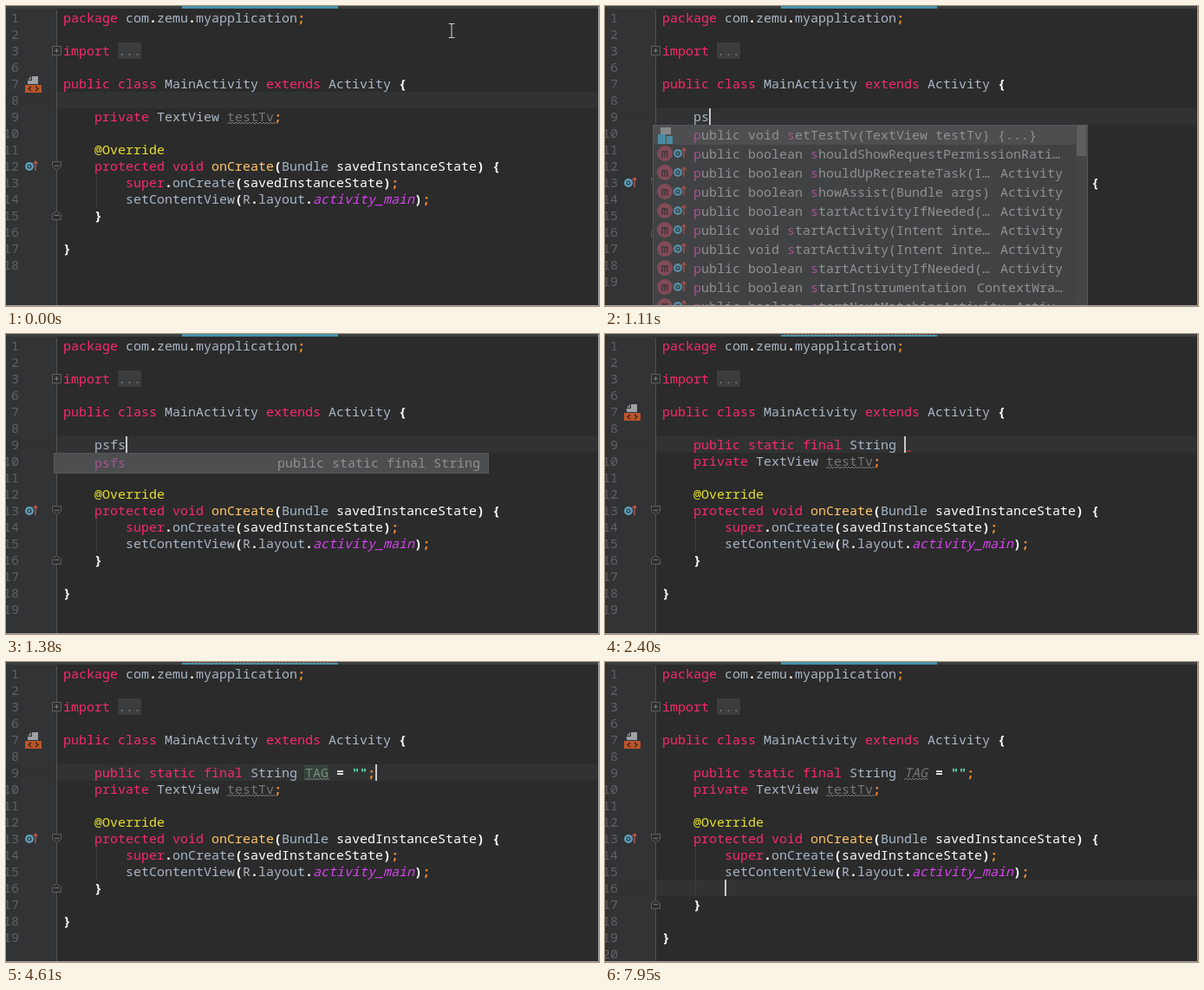
Animation of 684 by 346 pixels, one loop 8000 ms. Source, as an HTML page:

```html
<!DOCTYPE html>
<html lang="en">
<head>
<meta charset="utf-8">
<title>Live template in a code editor</title>
<style>
  html, body { margin: 0; width: 100%; height: 100%; overflow: hidden; background: #2b2b2b; }
  svg { display: block; width: 684px; height: 346px; }
  text { font: 15px "Noto Sans Mono", "DejaVu Sans Mono", monospace; white-space: pre; fill: #a9b7c6; }
  .num { fill: #606366; text-anchor: end; }
  .k { fill: #f92a6c; }
  .w { fill: #fff; }
  .b { fill: #fff; font-weight: 700; }
  .o { fill: #f08c34; font-weight: 600; }
  .g { fill: #75777a; }
  .gi { fill: #75777a; font-style: italic; }
  .a { fill: #e6e02c; }
  .f { fill: #ffc66d; }
  .m { fill: #d543ee; font-style: italic; font-weight: 500; }
  .s { fill: #55d3ad; font-weight: 600; }
  .tag { fill: #7b8a7c; }
  .p { fill: #8f9193; }
  .hit { fill: #a5568f; }
</style>
</head>
<body>
<svg id="stage" viewBox="0 0 684 346"></svg>
<script>
const LOOP = 8000, CHAR = 9, ROW = 19, BASE = 15, LEFT = 66;
const stage = document.getElementById('stage');
const rowY = row => 4 + ROW * row;
const colX = col => LEFT + CHAR * col;

const rect = (x, y, w, h, fill, extra = '') =>
  `<rect x="${x}" y="${y}" width="${w}" height="${h}" fill="${fill}" ${extra}/>`;
const path = (d, stroke, width = 1, fill = 'none') =>
  `<path d="${d}" stroke="${stroke}" stroke-width="${width}" fill="${fill}"/>`;
const circle = (x, y, r, fill) => `<circle cx="${x}" cy="${y}" r="${r}" fill="${fill}"/>`;
const wave = (x, y, w, color) =>
  path(`M${x} ${y}` + 'l2 -2l2 2'.repeat(Math.round(w / 4)), color);

// Segments are written as "class|text", joined by "~".
const spans = src => src.split('~').map(part => {
  const [cls, ...rest] = part.split('|');
  return `<tspan class="${cls}">${rest.join('|')}</tspan>`;
}).join('');
const label = (x, y, src) => `<text x="${x}" y="${y}">${spans(src)}</text>`;

const HEAD = [
  'k|package~t| com~b|.~t|zemu~b|.~t|myapplication~o|;', '',
  'k|import ~g|...', '',
  'k|public class ~t|MainActivity ~k|extends ~t|Activity ~b|{', ''
];
const BODY = [
  'k|    private ~t|TextView ~g|testTv~o|;', '',
  'a|    @Override',
  'k|    protected void ~f|onCreate~b|(~t|Bundle ~w|savedInstanceState~b|) {',
  'k|        super~b|.~t|onCreate~b|(~w|savedInstanceState~b|)~o|;',
  't|        setContentView~b|(~t|R~b|.~t|layout~b|.~m|activity_main~b|)~o|;'
];
const TAIL = ['b|    }', '', 'b|}', ''];

const METHODS = [
  ['boolean shouldShowRequestPermissionRati…', ''],
  ['boolean shouldUpRecreateTask(I…', 'Activity'],
  ['boolean showAssist(Bundle args)', 'Activity'],
  ['boolean startActivityIfNeeded(…', 'Activity'],
  ['void startActivity(Intent inte…', 'Activity'],
  ['void startActivity(Intent inte…', 'Activity'],
  ['boolean startActivityIfNeeded(…', 'Activity'],
  ['boolean startInstrumentation', 'ContextWra…'],
  ['boolean startNextMatchingActivity', 'Activ…']
];

// Each step changes only the listed fields.
const STEPS = [
  [0, { decl: null, extra: false, row: 5, col: -1, icon: true, popup: '', tag: 'tag',
        wave: -1, error: false, bulb: false, mouse: [514, 28] }],
  [280, { decl: '', row: 6, col: 4, mouse: null }],
  [680, { icon: false }],
  [960, { decl: 'p', col: 5 }],
  [1110, { decl: 'ps', col: 6, popup: 'methods' }],
  [1230, { decl: 'psf', col: 7, popup: 'psf,psfi:int,psfs:String' }],
  [1380, { decl: 'psfs', col: 8, popup: 'psfs:String' }],
  [1940, { popup: '' }],
  [2090, { decl: 'public static final String ', col: 31 }],
  [2400, { wave: 31, error: true, icon: true }],
  [2670, { decl: 'public static final String T', col: 32, wave: 32 }],
  [2800, { decl: 'public static final String TA', col: 33, wave: 33 }],
  [2950, { decl: 'public static final String TAG', col: 34, wave: 34 }],
  [3370, { decl: 'public static final String TAG ', col: 35, wave: 35 }],
  [3520, { decl: 'public static final String TAG =', col: 36, wave: 36 }],
  [3640, { decl: 'public static final String TAG = ', col: 37 }],
  [3790, { wave: 37 }],
  [4070, { decl: 'public static final String TAG = ""', col: 38, wave: -1 }],
  [4200, { wave: 39 }],
  [4340, { col: 39 }],
  [4480, { decl: 'public static final String TAG = "";', col: 40, wave: -1 }],
  [4890, { error: false, tag: 'gi' }],
  [5290, { col: 39 }],
  [6190, { bulb: true }],
  [6320, { mouse: [512, 160] }],
  [6450, { mouse: [521, 205] }],
  [6590, { mouse: [530, 246] }],
  [6720, { mouse: [536, 269] }],
  [6850, { mouse: [540, 262] }],
  [6990, { mouse: [541, 250] }],
  [7120, { mouse: [541, 242] }],
  [7270, { row: 12, col: 47, bulb: false }],
  [7800, { extra: true, row: 13, col: 8, mouse: null }]
];
const states = STEPS.reduce((list, [, change]) =>
  [...list, { ...list[list.length - 1], ...change }], []);

function declaration(s) {
  if (!s.decl) return '';
  const m = s.decl.match(/^(public static final )(String )(T?A?G?)( ?=? ?)("*)(;?)$/);
  if (!m) return 't|    ' + s.decl;
  return ['k|    ' + m[1], 't|' + m[2], s.tag + '|' + m[3], 'b|' + m[4], 's|' + m[5], 'o|' + m[6]].join('~');
}

function overrideIcon(x, y, r) {
  return circle(x, y, r, '#5f9fba') + circle(x, y, r * .52, '#2b4350') + circle(x, y, r * .25, '#5f9fba') +
    path(`M${x + 7} ${y + 5}v-11m-2.5 3l2.5 -3l2.5 3`, '#b9574a', 1.4);
}

function layoutIcon(x, y) {
  return path(`M${x + 8} ${y}h7v9h-12v-4h5z`, 'none', 0, '#9da1a3') +
    path(`M${x + 3} ${y + 4}l4 -4v4z`, 'none', 0, '#85898b') +
    rect(x, y + 10, 19, 9, '#b9552b') +
    path(`M${x + 7} ${y + 12}l-3 2.5l3 2.5m5 -5l3 2.5l-3 2.5`, '#38221a', 1.2);
}

function foldMark(y, dir) {
  const d = dir === 0 ? `M53.5 ${y - 5}h10v10h-10z`
    : `M53.5 ${y - 5 * dir}h10v${6 * dir}l-5 ${4 * dir}l-5 ${-4 * dir}z`;
  return path(d, '#5c5f61', 1, '#2d2f30') +
    path(`M56 ${y}h5` + (dir ? '' : 'm-2.5 -2.5v5'), '#77797c');
}

function bulb(x, y) {
  return circle(x, y - 2, 6, '#efb04c') + circle(x - 1, y - 3, 3, '#f8cf80') +
    rect(x - 3, y + 4, 6, 2, '#d9d9d9') + rect(x - 3, y + 7, 6, 2, '#a5a5a5');
}

function methodIcon(y) {
  return circle(69, y, 9, '#814b57') +
    `<text x="69" y="${y + 4.5}" text-anchor="middle" style="font-size:14px;fill:#2f2f31">m</text>` +
    `<g opacity=".8">${overrideIcon(84, y, 5)}</g>`;
}

function popup(kind) {
  if (!kind) return '';
  const full = kind === 'methods';
  const rows = full ? [] : kind.split(',');
  const h = full ? 220 : rows.length * 22 + 2;
  const textY = i => 154 + 22 * i;
  let out = rect(55, 137, 502, h, '#404244') + rect(55, 138, 502, 22, '#4c4e50') +
    path(`M55.5 ${137 + h}V137.5H556.5V${137 + h}` + (full ? '' : 'm0 -.5H55.5'), '#55585a');
  if (full) {
    out += rect(543, 138, 13, 208, '#434547') + rect(544, 138, 11, 35, '#5d5f61') +
      rect(64, 140, 12, 8, '#85898b') + rect(61, 148, 9, 11, '#4a8ba0') + rect(71, 150, 7, 9, '#4a8ba0') +
      label(102, textY(0), 'hit|p~p|ublic void ~hit|s~p|etTestTv(TextView testTv) {...}');
    METHODS.forEach(([sig, owner], i) => {
      const cut = sig.indexOf(' ') + 1;
      out += methodIcon(170 + 22 * i) +
        label(102, textY(i + 1), `hit|p~p|ublic ${sig.slice(0, cut)}~hit|s~p|${sig.slice(cut + 1)}`) +
        label(528 - CHAR * owner.length, textY(i + 1), 'p|' + owner);
    });
  } else {
    rows.forEach((item, i) => {
      const [key, type = ''] = item.split(':');
      const tail = ('public static final ' + type).trim();
      const n = rows.length === 1 ? 4 : 3;
      out += label(102, textY(i), `hit|${key.slice(0, n)}~p|${key.slice(n)}`) +
        label(547 - CHAR * tail.length, textY(i), 'p|' + tail);
    });
  }
  return out;
}

function pointer([x, y]) {
  return path(`M${x - 3.5} ${y - 7.5}h3l.5 1l.5 -1h3m-3.5 1v14m-3.5 1h3l.5 -1l.5 1h3`, '#c8c8c8', 1.1);
}

function draw(s) {
  const typed = s.decl !== null;
  const lines = [...HEAD, ...(typed ? [declaration(s)] : []), ...BODY, ...(s.extra ? [''] : []), ...TAIL];
  const shift = typed ? 1 : 0;
  const sig = 9 + shift, end = 12 + shift + (s.extra ? 1 : 0);
  const mid = row => rowY(row) + 9.5;

  let out = rect(0, 0, 684, 346, '#2b2b2b') + rect(0, 0, 58, 346, '#313335') +
    rect(0, rowY(s.row), 684, ROW, '#313233') +
    path('M58.5 4V346', '#505355') +
    rect(0, 0, 684, 3, '#3c3f41') + rect(203, 0, 180, 3, '#4a93a8');
  if (s.error) out += rect(203, 0, 180, 1, '#3c3f41') + wave(207, 1, 172, '#a65a56');

  out += rect(129, 42, 27, 19, '#3b3c3d') +
    path(`M104.5 ${rowY(sig + 1)}V${rowY(end)}`, '#3b3d3e');

  const name = typed ? (s.decl.match(/TAG|TA|T/) || [''])[0] : '';
  if (name) {
    const w = CHAR * name.length;
    if (s.tag === 'tag') out += rect(344.5, 119.5, w, 16, '#35423a', 'stroke="#3c4a40"');
    out += wave(345, rowY(6) + 18, w, '#77797b');
  }

  lines.forEach((src, i) => {
    const y = rowY(i) + BASE;
    out += `<text class="num" x="15" y="${y}">${i < 3 ? i + 1 : i + 3}</text>`;
    if (src) out += label(LEFT, y, src);
  });

  out += wave(255, rowY(6 + shift) + 18, 54, '#77797b');
  if (s.wave >= 0) out += wave(colX(s.wave), rowY(6) + 18, 8, '#c9423d');

  out += foldMark(mid(2), 0) + foldMark(mid(sig), 1) + foldMark(mid(end), -1) +
    overrideIcon(27, mid(sig) + .5, 5);
  if (s.icon) out += layoutIcon(22, 81);
  if (s.bulb) out += bulb(82, 125);
  if (s.col >= 0) out += rect(colX(s.col), rowY(s.row), 2, ROW, '#c8c8c8');
  out += popup(s.popup);
  if (s.mouse) out += pointer(s.mouse);
  out += path('M683.5 0V345.5H0', '#a0a2a4');
  stage.innerHTML = out;
}

let shown = -1;
const start = performance.now();
function tick() {
  const t = (performance.now() - start) % LOOP;
  let i = STEPS.length - 1;
  while (STEPS[i][0] > t) i--;
  if (i !== shown) draw(states[shown = i]);
  requestAnimationFrame(tick);
}
tick();
</script>
</body>
</html>
```
